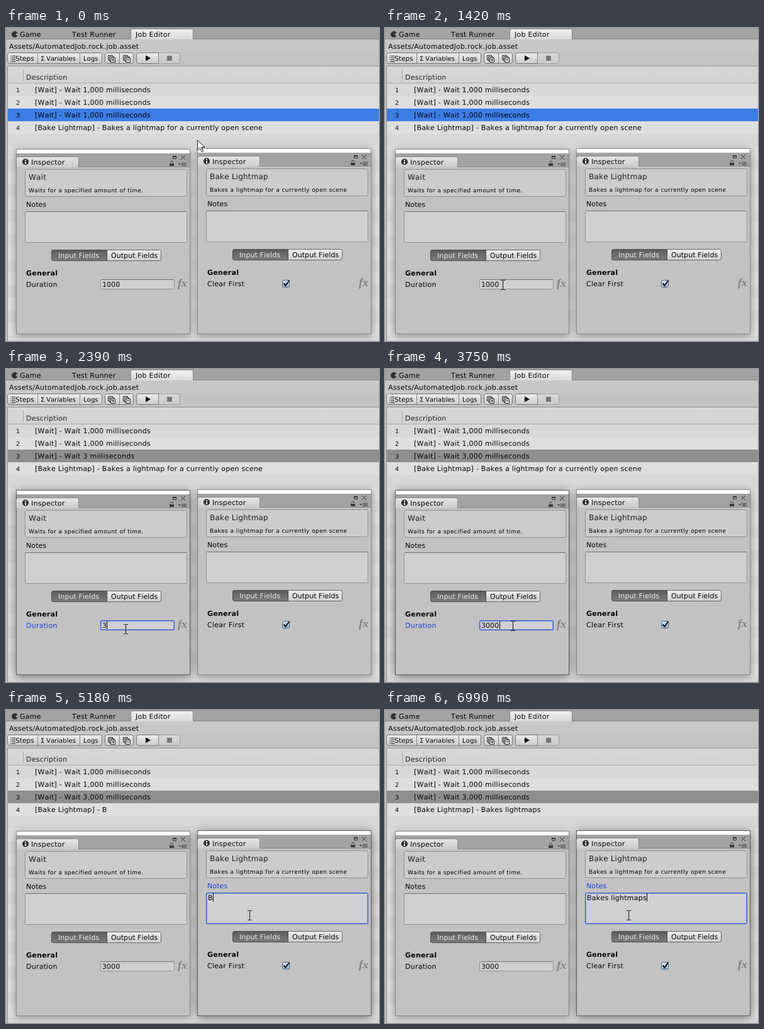
Write an HTML page with a canvas that moves like this. It is 593 by 497 pixels and loops after 7690 ms.

```html
<!DOCTYPE html>
<html lang="en">
<head>
<meta charset="utf-8">
<title>Job Editor</title>
<style>
  html, body { margin: 0; width: 100%; height: 100%; overflow: hidden; background: #c2c2c2; }
  canvas { display: block; }
</style>
</head>
<body>
<canvas id="stage" width="593" height="497"></canvas>
<script>
const ctx = document.getElementById('stage').getContext('2d');
const LOOP = 7690;
const BLUE = '#1f45d8';

// ---------- drawing helpers ----------
function rect(x, y, w, h, color) {
  ctx.fillStyle = color;
  ctx.fillRect(x, y, w, h);
}

function fade(y, h, top, bottom) {
  const g = ctx.createLinearGradient(0, y, 0, y + h);
  g.addColorStop(0, top);
  g.addColorStop(1, bottom);
  return g;
}

function frame(x, y, w, h, fill, stroke, radius = 0) {
  ctx.beginPath();
  ctx.roundRect(x + .5, y + .5, w - 1, h - 1, radius);
  ctx.fillStyle = fill;
  ctx.fill();
  ctx.strokeStyle = stroke;
  ctx.lineWidth = 1;
  ctx.stroke();
}

function shape(points, fill, stroke, width = 1) {
  ctx.beginPath();
  points.forEach(([x, y]) => ctx.lineTo(x, y));
  if (fill) { ctx.closePath(); ctx.fillStyle = fill; ctx.fill(); }
  if (stroke) { ctx.strokeStyle = stroke; ctx.lineWidth = width; ctx.stroke(); }
}

function setFont(size = 11, weight = '', spacing = .25) {
  ctx.font = `${weight} ${size}px "DejaVu Sans", sans-serif`;
  ctx.letterSpacing = spacing + 'px';
  ctx.textRendering = 'geometricPrecision';
  ctx.fontKerning = 'none';
}

function text(str, x, y, color = '#050505', ...font) {
  setFont(...font);
  ctx.fillStyle = color;
  ctx.fillText(str, x, y);
}

function textWidth(str) {
  setFont();
  return ctx.measureText(str).width;
}

// ---------- timeline ----------
// Position on a list of [time, x, y] keys
function along(keys, t) {
  const i = keys.findIndex(k => k[0] > t);
  if (i < 0) return keys[keys.length - 1].slice(1);
  if (i === 0) return keys[0].slice(1);
  const [t0, x0, y0] = keys[i - 1], [t1, x1, y1] = keys[i];
  const p = (t - t0) / (t1 - t0);
  return [Math.round(x0 + (x1 - x0) * p), Math.round(y0 + (y1 - y0) * p)];
}

const toField = [[685, 304, 178], [730, 306, 181], [790, 305, 196], [910, 290, 236],
                 [1045, 261, 302], [1225, 205, 384], [1330, 189, 404], [1405, 187, 408]];
const toNotes = [[3705, 190, 413], [3840, 229, 397], [3975, 336, 345], [4110, 387, 325]];

function pointer(t) {
  if (t < 730) return [304, 178];
  if (t < 1830) return along(toField, 730 + Math.floor((t - 730) / 45) * 45);
  if (t < 3750) return t < 1880 ? [186, 409] : t < 1930 ? [188, 412] : [190, 413];
  if (t < 4390) return along(toNotes, 3750 + Math.floor((t - 3750) / 45) * 45);
  return [387, 326];
}

const durationKeys = [2390, 2520, 2670, 2820];
const noteKeys = [5180, 5280, 5370, 5460, 5640, 6000, 6070,
                  ...Array.from({ length: 8 }, (_, i) => 6250 + i * 740 / 7)];
const typed = (str, keys, t) => str.slice(0, keys.filter(k => t >= k).length);

function stateAt(t) {
  return {
    duration: typed('3000', durationKeys, t) || '1000',
    note: typed('Bakes lightmaps', noteKeys, t),
    focus: t < 1570 ? '' : t < 4390 ? 'duration' : 'notes',
    selected: t >= 1600 && t < 2390,
    pointer: pointer(t)
  };
}

// ---------- main window ----------
function drawTabs() {
  rect(0, 0, 593, 497, '#c4c4c4');
  rect(0, 0, 593, 18, '#a3a3a3');
  rect(0, 17, 593, 1, '#858585');
  frame(198, 1, 100, 19, fade(1, 18, '#f0f0f0', '#dadada'), '#858585', [3, 3, 0, 0]);
  rect(0, 18, 593, 21, '#c8c8c8');
  ctx.beginPath();
  ctx.moveTo(15, 10);
  ctx.arc(14, 10, 5, .55, Math.PI * 2 - .55);
  ctx.fillStyle = '#303030';
  ctx.fill();
  text('Game', 22, 14);
  text('Test Runner', 105, 14);
  text('Job Editor', 206, 14);
  text('Assets/AutomatedJob.rock.job.asset', 5, 33);
}

function toolGroup(x, end, splits) {
  frame(x, 39, end - x, 18, fade(39, 18, '#ededed', '#cbcbcb'), '#737373', 3);
  splits.forEach(s => rect(s, 40, 1, 16, '#858585'));
}

function stackIcon(x, plus) {
  for (let d = 0; d <= 4; d += 2) frame(x + d, 43 + d, 8, 8, '#e4e4e4', '#222');
  rect(x + 6, 50, 4, 1, '#222');
  if (plus) rect(x + 8, 49, 1, 4, '#222');
}

function drawToolbar() {
  toolGroup(2, 153, [50, 117]);
  toolGroup(157, 203, [180]);
  toolGroup(207, 277, [242]);
  for (let y = 44; y < 54; y += 3) {
    rect(7, y, 1, 1, '#222');
    rect(9, y, 6, 1, '#222');
  }
  text('Steps', 15, 52, '#050505', 10.5, '', .1);
  text('Σ', 55, 52, '#050505', 10, '', 0);
  text('Variables', 64, 52, '#050505', 10, '', .05);
  text('Logs', 123, 52, '#050505', 10, '', .1);
  stackIcon(162, true);
  stackIcon(186, false);
  shape([[222, 43.5], [222, 52.5], [230, 48]], '#050505');
  rect(243, 39, 34, 18, 'rgba(200,200,200,.5)');
  rect(256, 44, 8, 8, '#777');
}

function drawList(state) {
  rect(2, 60, 591, 437, '#d8d8d8');
  rect(2, 60, 591, 1, '#8c8c8c');
  rect(2, 60, 1, 437, '#8c8c8c');
  rect(3, 61, 590, 27, fade(61, 27, '#d8d8d8', '#d2d2d2'));
  rect(27, 66, 1, 18, '#a8a8a8');
  rect(3, 87, 590, 1, '#a8a8a8');
  text('Description', 32, 82, '#222');
  for (let i = 1; i < 21; i += 2) rect(3, 88 + i * 20, 590, 20, '#dedede');
  rect(3, 128, 590, 20, state.focus ? '#8f8f8f' : '#3c7de6');

  const wait = ms => `[Wait] - Wait ${Number(ms).toLocaleString('en-US')} milliseconds`;
  const bake = state.note || 'Bakes a lightmap for a currently open scene';
  [wait(1000), wait(1000), wait(state.duration), '[Bake Lightmap] - ' + bake].forEach((row, i) => {
    const y = 102 + i * 20;
    text(i + 1, 16, y, '#050505', 9.5, '', 0);
    text(row, 46, y);
  });
}

// ---------- inspector windows ----------
function windowIcons(x, y) {
  frame(x + 249, y + 11, 6, 5, '#a3a3a3', '#333');
  rect(x + 249, y + 11, 6, 2, '#333');
  shape([[x + 262, y + 10], [x + 269, y + 17]], null, '#333');
  shape([[x + 269, y + 10], [x + 262, y + 17]], null, '#333');
  rect(x + 244, y + 23, 7, 4, '#3a3a3a');
  ctx.beginPath();
  ctx.arc(x + 247.5, y + 21.5, 2, Math.PI, Math.PI * 2.1);
  ctx.strokeStyle = '#3a3a3a';
  ctx.lineWidth = 1;
  ctx.stroke();
  shape([[x + 258, y + 23], [x + 262, y + 23], [x + 260, y + 25.5]], '#3a3a3a');
  for (let i = 0; i < 3; i++) rect(x + 263, y + 22 + i * 2, 8, 1, '#4a4a4a');
}

function input(x, y, w, h, focused) {
  frame(x, y, w, h, '#d0d0d0', focused ? '#3355d8' : '#939393', 1);
  if (focused) {
    ctx.strokeStyle = 'rgba(51,85,216,.45)';
    ctx.strokeRect(x + 1.5, y + 1.5, w - 3, h - 3);
  } else {
    rect(x + 1, y, w - 2, 1, '#6f6f6f');
  }
}

function inspector(x, y, { title, about, active, notesFocus, label, labelFocus }) {
  const height = 486 - y;
  ctx.save();
  ctx.shadowColor = active ? 'rgba(0,0,0,.5)' : 'rgba(0,0,0,.38)';
  ctx.shadowBlur = active ? 14 : 11;
  ctx.shadowOffsetY = 2;
  rect(x, y, 277, height, '#8a8a8a');
  ctx.restore();

  frame(x, y, 277, height, '#c2c2c2', active ? '#5a5a5a' : '#8a8a8a');
  rect(x + 1, y + 1, 275, 6, '#fff');
  rect(x + 1, y + 7, 275, 22, '#a3a3a3');
  rect(x + 1, y + 28, 275, 1, '#868686');
  frame(x, y + 12, 100, 18, fade(y + 12, 18, '#e6e6e6', '#cacaca'), '#868686', [3, 3, 0, 0]);
  rect(x + 1, y + 29, 275, 2, '#c2c2c2');
  ctx.beginPath();
  ctx.arc(x + 15, y + 20.5, 5, 0, 7);
  ctx.fillStyle = '#2b2b2b';
  ctx.fill();
  rect(x + 14, y + 17, 2, 2, '#eee');
  rect(x + 14, y + 20, 2, 4, '#eee');
  text('Inspector', x + 24, y + 25);
  windowIcons(x, y);

  frame(x + 14, y + 32, 258, 44, '#cccccc', '#8e8e8e', 3);
  text(title, x + 20, y + 49, '#1c1c1c', 12, '', .2);
  text(about, x + 20, y + 69, '#000', 9, '', .42);
  text('Notes', x + 16, y + 92, notesFocus ? BLUE : '#050505', 11, '', .1);
  input(x + 14, y + 99, 258, 50, notesFocus);

  frame(x + 56, y + 160, 175, 18, fade(y + 160, 18, '#f0f0f0', '#cecece'), '#666', 3);
  frame(x + 56, y + 160, 89, 18, fade(y + 160, 18, '#5c5c5c', '#7c7c7c'), '#4a4a4a', [3, 0, 0, 3]);
  text('Input Fields', x + 67, y + 173, '#e8e8e8', 11, '', .1);
  text('Output Fields', x + 151, y + 173, '#050505', 11, '', .05);

  text('General', x + 16, y + 201, '#050505', 11, 'bold');
  text(label, x + 16, y + 219, labelFocus ? BLUE : '#050505');
  ctx.font = 'italic bold 18px "Liberation Serif", serif';
  ctx.letterSpacing = '0px';
  ctx.fillStyle = '#808080';
  ctx.fillText('fx', x + 257, y + 219);
}

function caret(x, y) {
  rect(Math.round(x), y, 1, 13, '#000');
}

function drawInspectors({ focus, duration, selected, note }) {
  const left = () => {
    const focused = focus === 'duration';
    inspector(16, 192, {
      title: 'Wait', about: 'Waits for a specified amount of time.',
      active: focused, label: 'Duration', labelFocus: focused
    });
    input(150, 399, 118, 16, focused);
    const w = textWidth(duration);
    if (selected) rect(153, 401, Math.round(w), 12, '#709cda');
    text(duration, 153, 411, '#050505', 11, '', .05);
    if (focused && !selected) caret(153 + w, 400);
  };
  const right = () => {
    const focused = focus === 'notes';
    inspector(304, 191, {
      title: 'Bake Lightmap', about: 'Bakes a lightmap for a currently open scene',
      active: focused, notesFocus: focused, label: 'Clear First'
    });
    frame(439, 400, 12, 12, fade(400, 12, '#dce8f4', '#8fb2d8'), '#54687e', 2);
    shape([[441.5, 405.5], [444.5, 409], [450.5, 400.5]], null, '#111', 2);
    text(note, 321, 302);
    if (focused) caret(321 + textWidth(note), 291);
  };
  (focus === 'duration' ? [right, left] : [left, right]).forEach(draw => draw());
}

// ---------- pointer ----------
function drawPointer([x, y]) {
  const inside = (l, t, r, b) => x >= l && x <= r && y >= t && y <= b;
  const overText = inside(30, 291, 288, 341) || inside(318, 290, 576, 340) || inside(150, 399, 268, 415);
  if (overText) {
    for (const end of [y - 8, y + 7]) {
      rect(x - 3, end, 3, 1, '#111');
      rect(x + 1, end, 3, 1, '#111');
    }
    rect(x, y - 7, 1, 14, '#111');
  } else {
    const arrow = [[0, 0], [0, 16], [4, 12.5], [6.7, 18.5], [9, 17.5], [6.4, 11.5], [11.5, 11.5], [0, 0]];
    shape(arrow.map(([dx, dy]) => [x + dx + .5, y + dy]), '#fff', '#111', 1);
  }
}

function draw(t) {
  const state = stateAt(t);
  drawTabs();
  drawToolbar();
  drawList(state);
  drawInspectors(state);
  drawPointer(state.pointer);
}

const start = performance.now();
function tick() {
  draw((performance.now() - start) % LOOP);
  requestAnimationFrame(tick);
}
tick();
</script>
</body>
</html>
```
